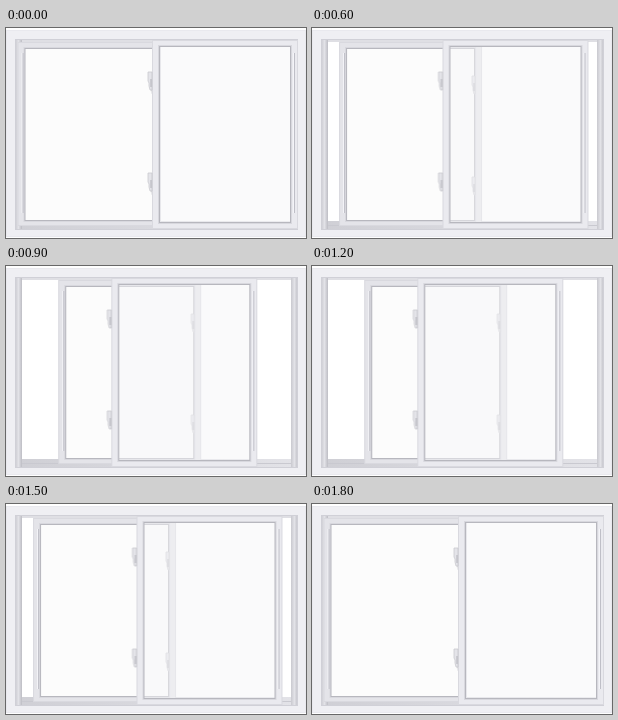
Write an HTML page that moves like this. It is 300 by 210 pixels and loops after 2 s.

```html
<!DOCTYPE html>
<html lang="en">
<head>
<meta charset="utf-8">
<title>Sliding window</title>
<style>
  html, body { margin: 0; width: 100%; height: 100%; overflow: hidden; background: #fff; }
  svg { display: block; width: 100%; height: 100%; }
</style>
</head>
<body>
<svg id="stage" viewBox="0 0 300 210">
  <defs>
    <linearGradient id="jamb">
      <stop offset="0" stop-color="#c9c9cf"/>
      <stop offset=".5" stop-color="#e2e2e7"/>
      <stop offset="1" stop-color="#bdbdc4"/>
    </linearGradient>
    <linearGradient id="sill">
      <stop offset="0" stop-color="#cfcfd5"/>
      <stop offset="1" stop-color="#e3e3e8"/>
    </linearGradient>
  </defs>
</svg>
<script>
const stage = document.getElementById('stage');
const NS = 'http://www.w3.org/2000/svg';

function add(parent, tag, attrs) {
  const node = document.createElementNS(NS, tag);
  for (const key in attrs) node.setAttribute(key, attrs[key]);
  return parent.appendChild(node);
}
const box = (parent, x, y, width, height, fill) =>
  add(parent, 'rect', { x, y, width, height, fill });
const outline = (parent, x, y, width, height, stroke) =>
  add(parent, 'rect', { x: x + .5, y: y + .5, width: width - 1, height: height - 1, fill: 'none', stroke });

function latch(parent, x, y, reach) {
  add(parent, 'path', {
    d: `M${x} ${y}h${-reach}v9l1 2v3l1 4h${reach - 2}z`,
    fill: '#e4e4e9', stroke: '#c4c4cb', 'stroke-width': .7
  });
  box(parent, x - 1.5, y + 7, 1, 8, '#b2b2ba');
}

function drawFrame() {
  box(stage, 0, 2, 300, 207, '#efeff3');
  outline(stage, 0, 2, 300, 207, '#e9e9ee');
  box(stage, 9, 11, 283, 191, '#dfdfe4');
  box(stage, 9, 193, 283, 8, 'url(#sill)');
  box(stage, 12, 197, 277, 1, '#c9c9d0');
  for (const x of [9, 285]) box(stage, x, 12, 7, 189, 'url(#jamb)');
  box(stage, 16, 14, 269, 179, '#fff');
  outline(stage, 9, 11, 283, 191, '#d0d0d7');
}

// A sash is a rim around glass, with a shaded inner edge and a pull on its outer stile.
function drawSash({ width, top, bottom, rim, glassTop, glassBottom, color, glass, glassOpacity, pullX }) {
  const sash = add(stage, 'g', {});
  const glassWidth = width - 2 * rim;
  const glassHeight = glassBottom - glassTop;
  add(sash, 'rect', { x: rim, y: glassTop, width: glassWidth, height: glassHeight, fill: glass, opacity: glassOpacity });
  add(sash, 'path', {
    d: `M0 ${top}H${width}V${bottom}H0ZM${rim} ${glassTop}V${glassBottom}h${glassWidth}V${glassTop}Z`,
    fill: color, 'fill-rule': 'evenodd'
  });
  outline(sash, 0, top, width, bottom - top, '#d9d9df');
  outline(sash, rim - 2, glassTop - 2, glassWidth + 4, glassHeight + 4, '#d8d8de');
  outline(sash, rim - 1, glassTop - 1, glassWidth + 2, glassHeight + 2, '#b7b7be');
  box(sash, pullX, 25, 1, 160, '#f4f4f8');
  box(sash, pullX + 1, 25, 1, 160, '#bfbfc7');
  return sash;
}

drawFrame();

const back = drawSash({
  width: 143, top: 14, bottom: 198, rim: 8, glassTop: 21, glassBottom: 192,
  color: '#e4e4e9', glass: '#fcfcfc', glassOpacity: 1, pullX: 4
});
const front = drawSash({
  width: 146, top: 12, bottom: 201, rim: 8, glassTop: 19, glassBottom: 194,
  color: '#eaeaef', glass: '#f6f6f7', glassOpacity: .5, pullX: 141
});
for (const y of [44, 145]) {
  latch(front, 0, y, 4);
  latch(back, 136, y + 4, 3);
}

const LOOP = 2000;
const TRAVEL = 45;
const HOLDS = 10;

// The sashes ease open and shut in ten held poses; after the first
// one, holds alternate between a short and a long beat.
function poses() {
  const list = [];
  let time = 0;
  for (let i = 0; i < HOLDS; i++) {
    const shift = TRAVEL * (1 - Math.cos(2 * Math.PI * i / HOLDS)) / 2;
    list.push({ time, shift });
    time += i === 0 ? 500 : i % 2 ? 100 : 200;
  }
  return [...list, { time, shift: 0 }, { time: LOOP, shift: 0 }];
}

function slide(sash, startX, direction) {
  const keyframes = poses().map(({ time, shift }) => ({
    offset: time / LOOP,
    transform: `translateX(${startX + direction * shift}px)`,
    easing: 'steps(1, end)'
  }));
  const motion = sash.animate(keyframes, { duration: LOOP, iterations: Infinity });
  motion.startTime = document.timeline.currentTime;
}

slide(back, 11.5, 1);
slide(front, 146, -1);
</script>
</body>
</html>
```
